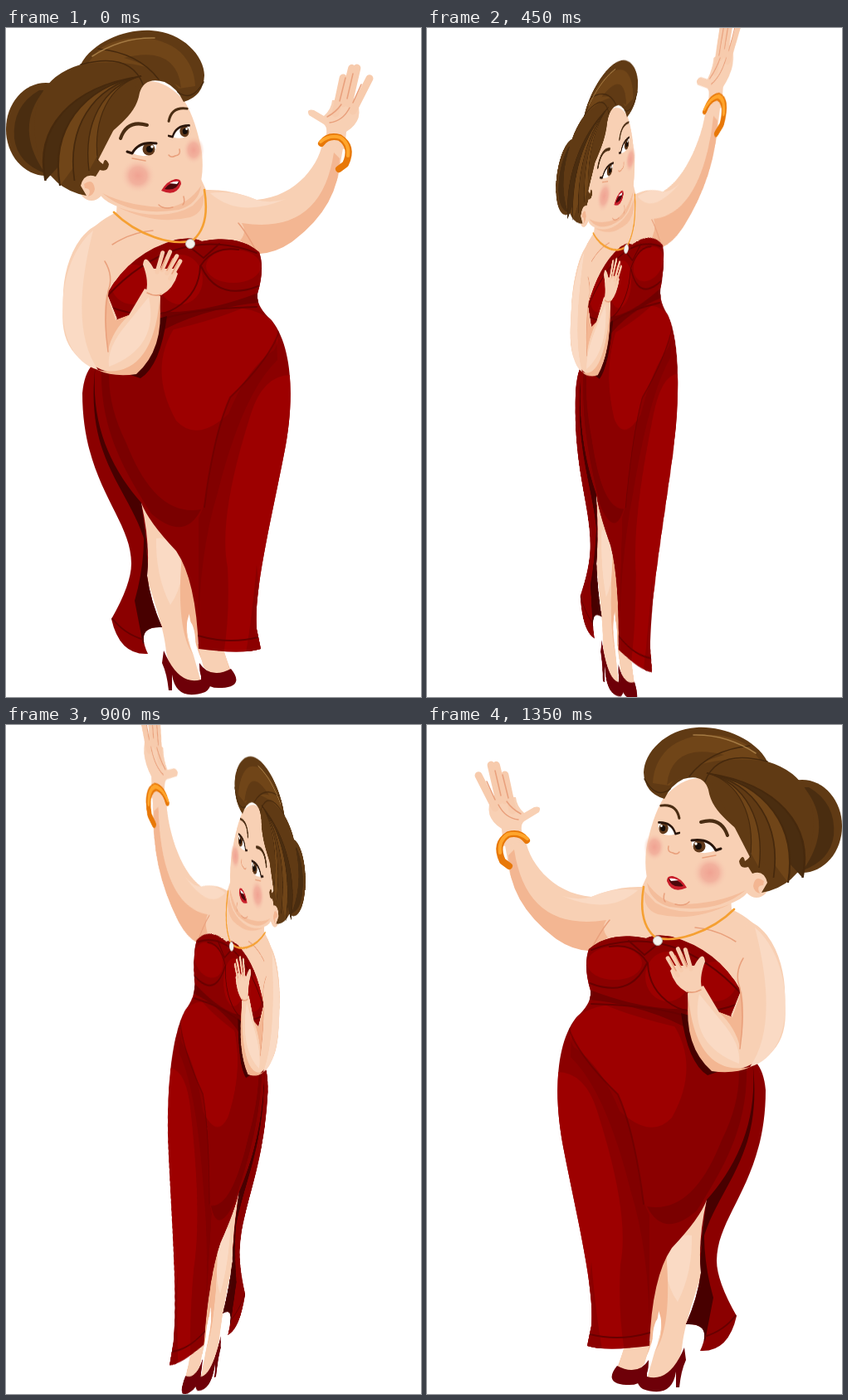
Write an HTML page without scripts that moves like this. It is 500x806 px and loops after 1.5 s.

```html
<!DOCTYPE html>
<html lang="en">
<head>
<meta charset="utf-8">
<title>Singer turning</title>
<style>
html, body { margin: 0; height: 100%; overflow: hidden; background: #fff; }
.stage {
  position: fixed; inset: 0; overflow: hidden; contain: strict;
  perspective: 820px; perspective-origin: 250px 403px;
}
svg {
  display: block; width: 500px; height: 806px;
  transform-origin: 250px 403px;
  animation: turn 1.5s infinite;
}
/* half turn in nine jumps; the axis straightens up as she goes round */
@keyframes turn {
  0%   { transform: rotate3d(.13, -1, 0, 0deg); animation-timing-function: steps(2); }
  20%  { transform: rotate3d(.13, -1, 0, 34deg); animation-timing-function: steps(1); }
  30%  { transform: rotate3d(.06, -1, 0, 59deg); animation-timing-function: steps(1); }
  40%  { transform: rotate3d(.045, -1, 0, 75deg); animation-timing-function: steps(2); }
  60%  { transform: rotate3d(.04, -1, 0, 120deg); animation-timing-function: steps(2); }
  80%  { transform: rotate3d(.04, -1, 0, 150deg); animation-timing-function: steps(1); }
  90%, 100% { transform: rotate3d(0, -1, 0, 180deg); }
}
.skin { fill: #f8d0b4; }
.pale { fill: #fadac4; }
.tan { fill: #f3b692; }
.red { fill: #8b0000; }
.lit { fill: #9d0000; }
.dim { fill: #700000; }
.dark { fill: #480000; }
.shoe { fill: #6e0008; }
.hair { fill: #603a14; }
.gloss { fill: #704518; }
.deep { fill: #4a2d10; }
.line { fill: none; stroke-linecap: round; stroke-linejoin: round; }
.crease { stroke: #e9a07c; stroke-width: 1.5; }
.fold { stroke: #680000; stroke-width: 2; }
.lock { stroke: #46290d; stroke-width: 1.5; }
.finger { stroke: #f7cbad; stroke-width: 9; }
</style>
</head>
<body>
<div class="stage">
<svg viewBox="0 0 500 806">
  <defs>
    <radialGradient id="blush">
      <stop offset="0" stop-color="#f0a292"/>
      <stop offset=".5" stop-color="#f1aa98" stop-opacity=".8"/>
      <stop offset="1" stop-color="#f8cdb4" stop-opacity="0"/>
    </radialGradient>
    <path id="finger" d="M0 0V-44"/>
    <path id="sweep" d="M0 0C-52 12 -78 60 -70 120"/>
    <g id="eye">
      <path d="M-16 5Q-8 -9 13 -7Q14 4 5 7T-16 5Z" fill="#fff"/>
      <circle cx="4" r="7.500" fill="#60391b"/>
      <circle cx="5" r="4" fill="#140c08"/>
      <circle cx="8" cy="-3" r="1.700" fill="#fff"/>
      <path d="M-22 3L-16 5Q-8 -10 13 -7" class="line" stroke="#2a160b" stroke-width="3"/>
    </g>
    <path id="brow" d="M-16 9Q-8 -14 16 -7" class="line" stroke="#4a2d13" stroke-width="4"/>
    <clipPath id="gown">
      <path id="cut" d="M122 320Q150 270 205 255Q225 251 236 257Q280 248 305 270Q312 290 303 320Q301 335 320 352C350 390 345 465 335 513C320 590 298 680 302 724L307 748Q285 755 232 748Q229 665 205 630Q171 594 163 572Q174 620 170 660Q174 690 188 722Q155 720 171 754Q137 756 127 712Q151 670 151 645C151 590 92 550 92 440Q94 417 104 406L134 350Z"/>
    </clipPath>
  </defs>

  <!-- legs and shoes -->
  <path d="M214 650L231 690V742L262 750L272 778H246Q222 750 214 650Z" class="tan"/>
  <path d="M232 748H262L270 775Q250 783 238 770Z" class="skin"/>
  <path d="M233 765Q246 785 271 772Q288 793 260 795T233 765Z" class="shoe"/>
  <path d="M163 572Q220 620 221 690Q213 725 226 756L235 788Q202 795 193 752C191 725 178 690 170 664Q174 620 163 572Z" class="skin"/>
  <path d="M181 615Q205 610 213 655Q209 680 198 695Q180 660 181 615Z" class="pale"/>
  <path d="M212 635Q232 675 219 712Q214 735 226 756Q204 725 212 635Z" class="tan"/>
  <path d="M219 712Q230 720 228 752Q215 735 219 712Z" fill="#fff"/>
  <path d="M190 750Q208 793 235 785V769Q255 790 240 800Q205 812 200 779V798H196Q194 778 188 765Z" class="shoe"/>

  <!-- raised arm and chest -->
  <path d="M133 222Q95 240 85 274Q50 365 88 397Q114 421 150 417L215 300L305 272Q370 260 400 180L407 139L382 133C380 162 351 203 302 207Q270 194 241 195L225 160L135 190Z" class="skin"/>
  <path d="M305 272L282 256Q291 246 284 235Q380 250 395 150L402 157Q402 215 344 258Q325 271 305 272Z" class="tan"/>
  <path d="M246 199Q280 230 337 206Q319 212 302 207Q276 195 246 199Z" class="pale"/>
  <path d="M301 268Q290 247 280 235M128 261Q151 246 177 244" class="line crease"/>
  <path d="M135 216Q190 235 225 214L238 200Q240 222 222 228Q180 238 135 216Z" class="tan" opacity=".6"/>

  <!-- raised hand -->
  <path d="M382 140Q390 122 383 116L365 105Q361 97 371 99L383 106Q392 98 393 87L421 85Q434 110 410 125L408 146Z" class="skin"/>
  <g class="line finger">
    <use href="#finger" x="397" y="103" transform="rotate(12 397 103)"/>
    <use href="#finger" x="406" y="91" transform="rotate(14 406 91)"/>
    <use href="#finger" x="413" y="91" transform="rotate(13 413 91)"/>
    <use href="#finger" x="418" y="100" transform="rotate(27 418 100)"/>
  </g>
  <path d="M402 88L409 60M411 85L418 55M418 90L428 68M387 107Q398 101 404 92M390 114Q406 112 414 96" class="line crease"/>
  <path d="M380 139Q388 128 402 132Q419 143 409 164L401 170" class="line" stroke="#e87808" stroke-width="8"/>
  <path d="M379 137Q390 128 403 132Q414 139 412 154" class="line" stroke="#ffa52c" stroke-width="4"/>

  <!-- dress -->
  <use href="#cut" class="red"/>
  <g clip-path="url(#gown)">
    <path d="M163 572Q172 630 155 690L165 742L190 725L172 655Z" class="dark"/>
    <path d="M108 405C100 480 130 535 163 572L172 640C160 560 92 530 108 405Z" class="dark"/>
    <path d="M115 405C112 480 140 530 175 585Q215 620 235 580Q180 590 145 500Q120 450 125 405Z" class="dim" opacity=".6"/>
    <path d="M205 358Q270 320 318 350Q334 371 323 388Q290 410 268 465Q230 500 205 473Q170 410 205 358Z" class="lit"/>
    <path d="M326 374Q316 396 270 445C240 510 250 560 232 590L232 756Q230 640 255 560Q285 440 327 400Z" class="dim" opacity=".4"/>
    <path d="M345 418Q310 417 295 465Q255 590 267 650Q270 708 262 755H305L355 450Z" class="lit"/>
    <path d="M302 646Q296 715 289 752H312Z" class="red"/>
    <path d="M330 363Q319 398 270 445Q250 490 239 577" class="line fold" opacity=".6"/>
    <path d="M231 732Q268 743 304 734M127 710Q142 730 166 737" class="line fold" stroke-width="7"/>

    <path d="M120 350L122 312L210 250H315L304 328Q270 348 186 367Z" class="red"/>
    <ellipse cx="153" cy="309" rx="26" ry="24" class="lit"/>
    <ellipse cx="210" cy="303" rx="27" ry="30" class="lit"/>
    <ellipse cx="274" cy="287" rx="33" ry="20" class="lit"/>
    <path d="M187 342Q239 344 304 319V331Q239 338 189 364Z" class="dim"/>
    <path d="M123 322Q160 282 205 267T302 271M234 287Q250 262 280 267M234 287Q233 319 205 337T125 336M235 287Q255 330 304 311M219 262L238 277L257 260M194 349Q230 338 302 336" class="line fold"/>
    <path d="M150 418Q181 402 184 350L194 347Q186 407 162 422Z" class="dark"/>
  </g>

  <!-- necklace -->
  <path d="M130 222C156 248 202 265 226 255Q246 237 239 195" class="line" stroke="#f5a032" stroke-width="2.600"/>
  <circle cx="222" cy="260" r="5.500" fill="#f4f2ee" stroke="#b9b2ab"/>

  <!-- arm across the chest -->
  <path d="M112 236C80 250 67 297 69 332C70 388 105 420 150 417Q185 400 186 323L167 314L148 346L132 352L121 320Q118 290 131 267Z" class="skin"/>
  <path d="M105 244C60 280 50 395 111 412Q75 360 105 244Z" class="pale"/>
  <path d="M121 320L132 352L148 346Q128 365 123 388Q116 350 121 320Z" class="tan"/>
  <path d="M124 408Q121 385 146 356L172 324Q185 385 124 408Z" class="pale"/>
  <path d="M110 412Q175 425 185 329Q191 387 157 417Q130 421 110 412Z" class="tan"/>
  <path d="M119 281Q130 299 123 317Q117 350 123 390" class="line crease"/>
  <path d="M168 320Q173 306 165 285Q167 270 178 290H202L207 296Q202 314 187 322Z" class="skin"/>
  <g class="line finger" transform="translate(182 294) scale(.55) rotate(16)" stroke-width="12">
    <use href="#finger"/>
    <use href="#finger" x="8" y="-8" transform="rotate(8)"/>
    <use href="#finger" x="20" y="-8" transform="rotate(14)"/>
    <use href="#finger" x="32" y="-2" transform="rotate(14)"/>
  </g>
  <path d="M187 291L192 278M194 292L201 278M200 296L207 283M170 319Q179 324 187 321" class="line crease"/>

  <!-- head -->
  <ellipse cx="48" cy="122" rx="48" ry="56" class="hair"/>
  <path d="M40 75Q7 94 10 133Q14 163 47 175Q9 120 46 75Z" class="deep"/>
  <path d="M163 65Q190 59 215 88Q229 111 236 150Q243 220 188 221Q130 222 114 202L101 170L140 85Z" class="skin"/>
  <path d="M116 199Q150 216 197 216Q220 212 235 190Q232 212 208 219Q150 228 116 199Z" class="tan" opacity=".7"/>
  <path d="M184 213Q190 219 201 216M214 203Q216 210 213 213" class="line crease"/>
  <ellipse cx="103" cy="192" rx="15" ry="16" class="skin"/>
  <path d="M94 188Q105 180 107 194Q106 201 99 203Q104 193 95 193Z" class="tan"/>
  <circle cx="159" cy="178" r="21" fill="url(#blush)"/>
  <ellipse cx="226" cy="147" rx="13" ry="17" fill="url(#blush)"/>

  <path d="M90 44C105 16 145 1 175 3C213 5 239 34 239 57Q238 82 214 89Q206 72 191 65Q167 58 161 78C156 110 125 121 112 143Q105 157 117 164Q119 154 124 164Q123 174 113 171L108 179Q94 174 90 190L97 202Q55 195 38 150Q20 65 90 44Z" class="hair"/>
  <path d="M113 25C145 5 187 9 210 29Q227 46 228 70L208 73Q180 35 98 43Z" class="gloss"/>
  <path d="M142 36Q205 20 211 72Q198 62 186 63Q176 45 142 36Z" class="hair"/>
  <g class="lock" transform="translate(163 58)">
    <use href="#sweep" class="deep" transform="scale(1.650 1.050)"/>
    <use href="#sweep" class="gloss" transform="scale(1.400 1.100)"/>
    <use href="#sweep" class="hair" transform="scale(1.150 1.050)"/>
    <use href="#sweep" class="gloss" transform="scale(.9 .95)"/>
    <use href="#sweep" class="hair" transform="scale(.75 .85)"/>
  </g>
  <path d="M90 44Q150 28 165 68M111 25Q160 30 184 62M207 77Q224 90 238 65" class="line lock"/>
  <path d="M104 34Q139 11 179 12" class="line" stroke="#a47a43" stroke-width="1.500"/>

  <!-- face -->
  <use href="#brow" x="154" y="124"/>
  <use href="#brow" transform="translate(207 104) rotate(-8) scale(.75)"/>
  <use href="#eye" x="168" y="146"/>
  <use href="#eye" transform="translate(212 125) rotate(-8) scale(.75 .9)"/>
  <path d="M152 157L168 160M196 153Q199 157 204 154Q211 153 209 146" class="line crease"/>
  <path d="M187 196Q194 184 204 182Q211 181 211 188Q205 204 187 196Z" fill="#c91f2b"/>
  <path d="M191 194Q196 186 209 185Q206 197 191 194Z" fill="#4b080b"/>
  <path d="M197 187Q204 184 208 185L206 188Z" fill="#fff"/>
</svg>
</div>
</body>
</html>
```
